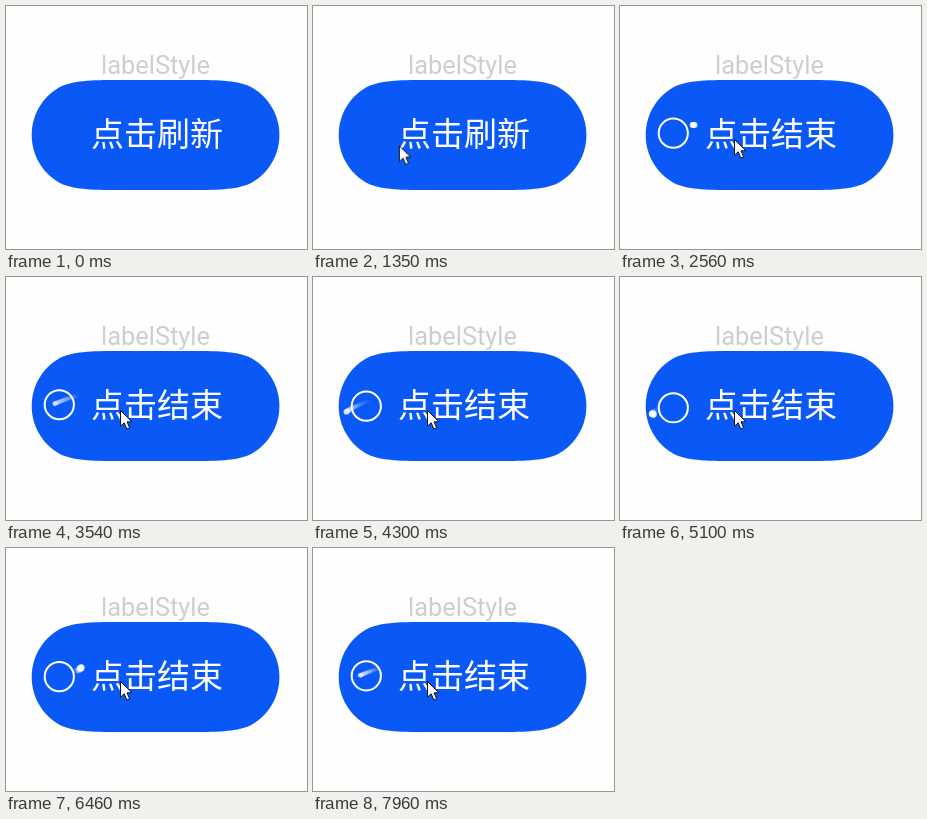
An HTML page for the animation above (8 s loop, 301 by 243 pixels).

```html
<!DOCTYPE html>
<html lang="zh-CN">
<head>
<meta charset="utf-8">
<title>Loading button</title>
<style>
  html, body { margin: 0; width: 100%; height: 100%; overflow: hidden; background: #fefefe; }
  svg { display: block; width: 301px; height: 243px; }
  text { text-anchor: middle; }
  .label { font: 25.4px Roboto, Inter, sans-serif; fill: #cecece; }
  .title { font: 33px "Noto Sans CJK SC", "Noto Sans CJK", sans-serif; fill: #fff; }

  #button, #cursor, .title, #loader { animation: 8s linear infinite; }
  #button { fill: #0a59f7; animation-name: press; }
  #cursor { animation-name: point; }
  .idle { animation-name: hide; }
  .busy, #loader { animation-name: show; }

  @keyframes press {
    0%, 27.24% { fill: #0a59f7; }
    27.25%, 30.12% { fill: #0a52e3; }
    31.4%, 100% { fill: #0a59f7; }
  }
  @keyframes point {
    0%, 8.2% { transform: translate(-16px, 142.5px); }
    13% { transform: translate(38px, 142px); }
    18.2% { transform: translate(102px, 138.5px); }
    21.9%, 100% { transform: translate(114px, 133px); }
  }
  @keyframes hide {
    0%, 30.12% { opacity: 1; }
    30.125%, 100% { opacity: 0; }
  }
  @keyframes show {
    0%, 30.12% { opacity: 0; }
    30.125%, 100% { opacity: 1; }
  }
</style>
</head>
<body>
<svg viewBox="0 0 301 243">
  <text class="label" x="149.5" y="68.4">labelStyle</text>
  <path id="button" d="M108 74 H191 C219 74 236 75.7 246 81.5 C262.8 91.3 273.4 109 273.4 129
    S262.8 166.7 246 176.5 C236 182.3 219 184 191 184 H108 C80 184 63 182.3 53 176.5
    C36.2 166.7 25.7 149 25.7 129 S36.2 91.3 53 81.5 C63 75.7 80 74 108 74 Z"/>
  <g id="loader" fill="#fff">
    <circle id="ring" cx="53.3" cy="128.5" r="14.6" fill="none" stroke="#fff" stroke-width="2"/>
    <g id="comet"></g>
  </g>
  <text class="title idle" x="151" y="140">点击刷新</text>
  <text class="title busy" x="151" y="140">点击结束</text>
  <path id="cursor" d="M.5 .5 V16.2 L4.2 12.8 L6.8 19 L9.6 17.8 L7 11.8 H12 Z"
    fill="#fff" stroke="#111" stroke-width="1"/>
</svg>
<script>
  // time, comet angle, tail length in degrees, ring height
  const keys = [
    [2410, 15, 25, 127.2],
    [3290, 83, 65, 127.1],
    [3540, 101, 72, 127.8],
    [4300, 156, 85, 129.2],
    [5200, 206, 70, 131],
    [5850, 248, 60, 130.5],
    [6460, 355, 40, 128.6],
    [7000, 388, 42, 127.2],
    [7560, 438, 48, 127.4],
    [8000, 467, 56, 127.9]
  ];
  const DOTS = 34, RAD = Math.PI / 180, TILT = 22 * RAD;
  const ring = document.getElementById('ring');
  const comet = document.getElementById('comet');
  const clock = document.getElementById('loader').getAnimations()[0];

  const dots = Array.from({ length: DOTS }, (_, i) => {
    const dot = document.createElementNS('http://www.w3.org/2000/svg', 'circle');
    const f = i / (DOTS - 1);
    dot.setAttribute('opacity', i === DOTS - 1 ? 0.7 : 0.26 * f ** 1.4);
    return comet.appendChild(dot);
  });

  function sample(t) {
    let i = 1;
    while (i < keys.length - 1 && t > keys[i][0]) i++;
    const a = keys[i - 1], b = keys[i];
    const f = Math.max(0, (t - a[0]) / (b[0] - a[0]));
    return a.map((v, k) => v + (b[k] - v) * f);
  }

  // Tilted flat orbit; the lower half is nearer and so larger.
  function place(dot, angle, scale) {
    const along = 23.4 * Math.cos(angle), depth = Math.sin(angle), up = 3 * depth;
    dot.setAttribute('cx', 53.5 + along * Math.cos(TILT) - up * Math.sin(TILT));
    dot.setAttribute('cy', 128 - along * Math.sin(TILT) - up * Math.cos(TILT));
    dot.setAttribute('r', (3.2 - 0.8 * depth) * scale);
  }

  function draw() {
    const [, angle, tail, ringY] = sample((clock.currentTime || 0) % 8000);
    ring.setAttribute('cy', ringY);
    dots.forEach((dot, i) => {
      const f = i / (DOTS - 1);
      place(dot, (angle - tail * (1 - f)) * RAD, 0.85 + 0.15 * f);
    });
    requestAnimationFrame(draw);
  }
  draw();
</script>
</body>
</html>
```
